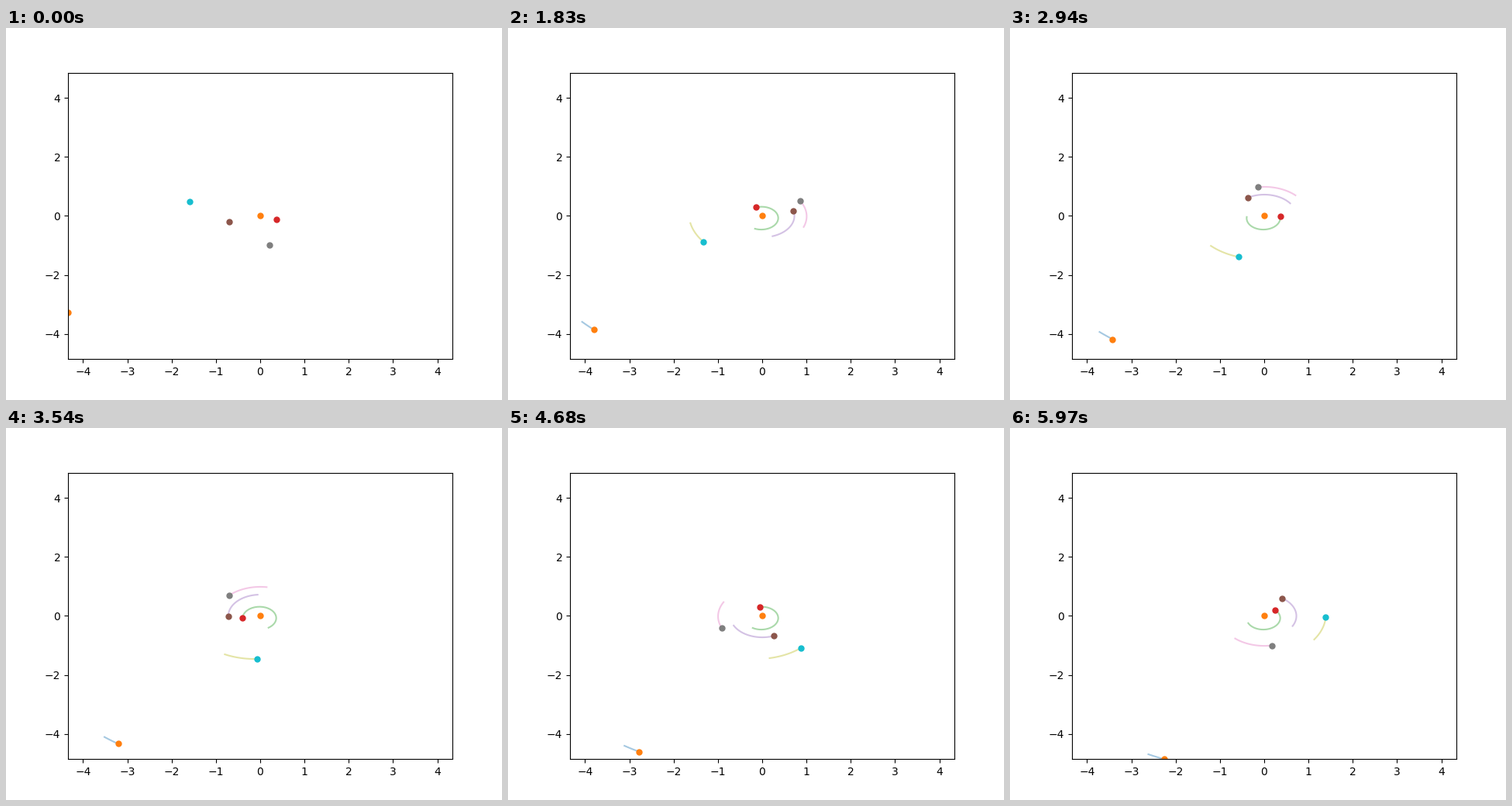
A matplotlib script that plays this animation: 640x480 px, repeating every 6 s.

```python
import numpy as np
import matplotlib.pyplot as plt
from matplotlib.animation import FuncAnimation

FRAMES = 200
INTERVAL = 30
STEP = 365 / FRAMES  # days per frame
TRAIL = 30           # points per trail


def orbit(a, e, peri, lon):
    """Kepler ellipse from size (AU), eccentricity, perihelion and start (deg)."""
    days = np.arange(FRAMES) * STEP
    rate = 360 / 365.256 / a ** 1.5
    mean = np.radians(lon - peri + rate * days)
    ecc = mean + e * np.sin(mean)
    for _ in range(8):
        ecc -= (ecc - e * np.sin(ecc) - mean) / (1 - e * np.cos(ecc))
    ellipse = a * (np.cos(ecc) - e + 1j * np.sqrt(1 - e * e) * np.sin(ecc))
    path = ellipse * np.exp(1j * np.radians(peri))
    return path.real, path.imag


sun = np.zeros((2, FRAMES))
mercury = orbit(0.3871, 0.2056, 77.5, 6.7)
venus = orbit(0.7233, 0.0068, 131.6, 194.9)
earth = orbit(1, 0.0167, 103.1, 282.1)
mars = orbit(1.5237, 0.0934, -23.7, 164.1)
jupiter = orbit(5.2026, 0.0483, 14.8, 219.17)

paths = np.array([sun, mercury, venus, earth, mars, jupiter])
xmax, ymax = np.abs(paths).max(axis=(0, 2))

fig, ax = plt.subplots(figsize=(6.4, 4.8), dpi=100)
ax.set_xlim(-xmax, xmax)
ax.set_ylim(-ymax, ymax)

# Each body takes the next two colours of the cycle: trail, then dot
bodies = []
for k in range(len(paths)):
    trail, = ax.plot([], [], color=f"C{2 * k}", lw=1.5, alpha=0.4)
    dot, = ax.plot([], [], "o", color=f"C{2 * k + 1}", ms=5)
    bodies.append((trail, dot))


def update(i):
    start = max(0, i - TRAIL + 1)
    for (x, y), (trail, dot) in zip(paths, bodies):
        trail.set_data(x[start:i + 1], y[start:i + 1])
        dot.set_data([x[i]], [y[i]])
    return [artist for pair in bodies for artist in pair]


anim = FuncAnimation(fig, update, frames=FRAMES, interval=INTERVAL,
                     repeat=True, repeat_delay=0, blit=False)
plt.show()
```
